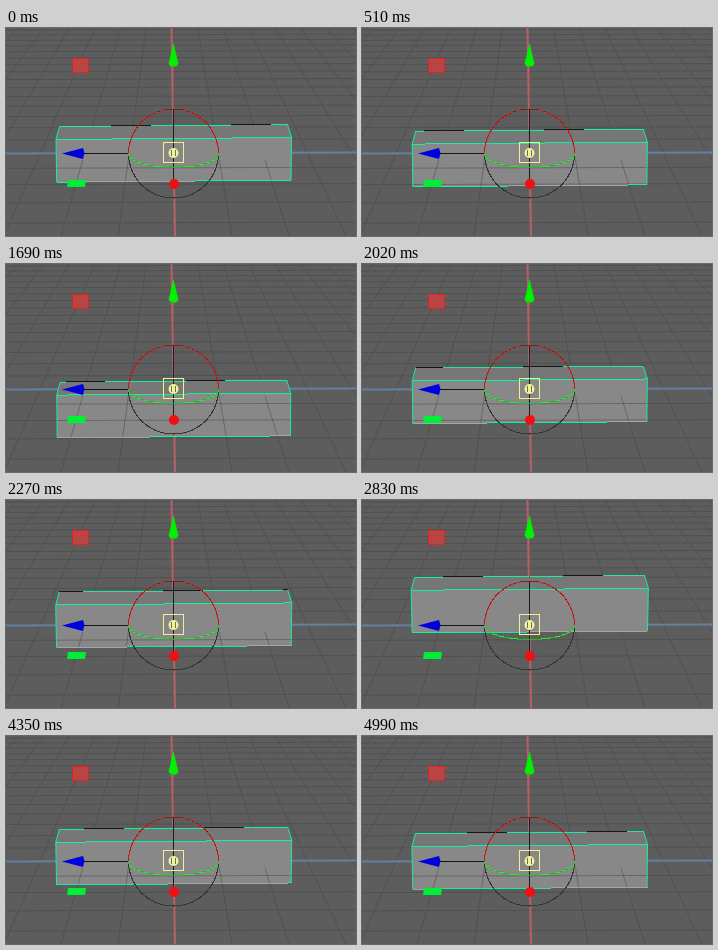
An HTML page with a canvas that plays this animation: 350x208 px, repeating every 9840 ms.

```html
<!DOCTYPE html>
<html lang="en">
<head>
<meta charset="utf-8">
<title>Moving a box in a 3D viewport</title>
<style>
html, body { margin: 0; width: 100%; height: 100%; overflow: hidden; background: #5d5d5d; }
canvas { display: block; width: 350px; height: 208px; }
</style>
</head>
<body>
<canvas id="view" width="350" height="208"></canvas>
<script>
const ctx = document.getElementById('view').getContext('2d');
const LOOP = 9840;
const TILT = 1 / 120;
const GREEN = '#12f09a', PALE = '#a2a5a3', DARK = '#101a16';

// Drags of the box: they ease out, but are only redrawn about every 70 ms
const moves = [
  { start: 150, first: 220, last: 290, to: 0.6, power: 1 },
  { start: 400, first: 440, last: 1190, to: 22.3, power: 1.4 },
  { start: 1640, first: 1690, last: 2830, to: -21.2, power: 1.48 },
  { start: 3780, first: 3840, last: 4990, to: -1, power: 2.5 }
];

function offset(t) {
  let d = 0;
  for (const { start, first, last, to, power } of moves) {
    if (t < first) break;
    const step = (last - first) / Math.round((last - first) / 70);
    const seen = Math.min(last, first + Math.floor((t - first) / step) * step);
    const p = (seen - start) / (last - start);
    d += (to - d) * (1 - (1 - p) ** power);
  }
  return d;
}

function path(p) {
  ctx.beginPath();
  for (let i = 0; i < p.length; i += 2) ctx.lineTo(p[i], p[i + 1]);
}

function line(color, width, ...p) {
  ctx.strokeStyle = color;
  ctx.lineWidth = width;
  path(p);
  ctx.stroke();
}

function poly(color, ...p) {
  ctx.fillStyle = color;
  path(p);
  ctx.fill();
}

function dot(color, x, y) {
  ctx.fillStyle = color;
  ctx.fillRect(Math.floor(x), Math.floor(y), 1, 1);
}

function disc(color, x, y, r) {
  ctx.fillStyle = color;
  ctx.beginPath();
  ctx.arc(x, y, r, 0, Math.PI * 2);
  ctx.fill();
}

// Half ellipse in hard pixels, duller on odd rows
function arc(bright, dull, ry) {
  for (let i = 0; i <= 400; i++) {
    const a = Math.PI * i / 400;
    const y = Math.floor(125.5 + ry * Math.sin(a));
    dot(y % 2 ? dull : bright, 167.5 + 45 * Math.cos(a), y);
  }
}

function grid(color) {
  for (let n = -9; n <= 9; n++) {
    if (n) line(color, 1, 166 + n * 25.7, 0, 169 + n * 57, 208);
  }
  for (let n = -17; n <= 4; n++) {
    const y = -171 + 6216 / (21 - n);
    if (n) line(color, 1, 0, y + 0.5, 350, y - 0.5);
  }
}

// Slightly tilted edge in hard pixel steps
function edge(y, x0, x1, pick) {
  for (let x = Math.round(x0); x < x1; x++) {
    const at = y - x * TILT, row = Math.floor(at);
    dot(pick(row, at - row), x, row);
  }
}

function box(d) {
  const back = 98.87 + d, front = 111.88 + d, base = 154.57 + d;
  const grow = -d * 0.04;
  const bl = 53.5 - grow, br = 281.5 + grow;
  const fl = 50 - grow, fr = 285.5 + grow;
  const dl = 50.7 - grow * 0.6, dr = 285 + grow * 0.6;
  const corner = (x, y) => [x, y - x * TILT];
  const [BL, BR, FL, FR, DL, DR] = [
    corner(bl, back), corner(br, back), corner(fl, front),
    corner(fr, front), corner(dl, base), corner(dr, base)
  ];
  poly('#777777', ...BL, ...BR, ...FR, ...FL);
  poly('#888888', ...FL, ...FR, ...DR, ...DL);

  // The part below the floor shows the floor lines in front of it
  ctx.save();
  path([...FL, ...FR, ...DR, ...DL]);
  ctx.clip();
  ctx.beginPath();
  ctx.rect(0, 132, 350, 76);
  ctx.clip();
  grid('rgba(70,70,70,.5)');
  ctx.restore();

  line(GREEN, 1, ...BL, ...FL, ...DL);
  line(GREEN, 1, ...BR, ...FR, ...DR);
  edge(back, bl, br, (row, part) => part > 0.67 ? DARK : GREEN);
  edge(front, fl, fr, () => GREEN);
  edge(base, dl, dr, row => row % 2 ? PALE : GREEN);
}

function handles() {
  line('#8c5a52', 1, 167.5, 38, 167.5, 81);
  line('#1c1c1c', 1, 167.5, 81, 167.5, 152);
  line('#141414', 1, 76, 125.5, 123, 125.5);
  arc('#303030', '#383838', 44.5);
  arc('#f01414', '#861c1c', -44.5);
  arc('#22f022', '#20b82c', 14);

  poly('#00f000', 167.5, 15, 172.5, 36, 170, 38.5, 165, 38.5, 162.5, 36);
  poly('#0000dc', 56, 125.5, 77, 120, 78.5, 125, 77, 131);
  disc('#f01010', 168, 156, 5);

  ctx.fillStyle = '#b84444';
  ctx.fillRect(66, 30, 17, 15);
  ctx.strokeStyle = '#e02424';
  ctx.lineWidth = 1;
  ctx.strokeRect(66.5, 30.5, 16, 14);
  poly('#00ee38', 62, 152, 80, 152, 79, 159, 61, 159);

  ctx.strokeStyle = '#f0f08c';
  ctx.strokeRect(157.5, 114.5, 20, 20);
  disc('#f2f296', 167.5, 125, 5);
  for (const x of [165.5, 169.5]) line('#6c6c58', 1, x, 122, x, 128);
}

function draw(t) {
  ctx.fillStyle = '#5d5d5d';
  ctx.fillRect(0, 0, 350, 208);
  grid('#505050');
  line('#6480a0', 2, 0, 125.5, 350, 124.5);
  line('#b8606a', 2, 165.5, 0, 169, 208);
  box(offset(t));
  handles();
}

const start = performance.now();
function loop() {
  draw((performance.now() - start) % LOOP);
  requestAnimationFrame(loop);
}
loop();
</script>
</body>
</html>
```
